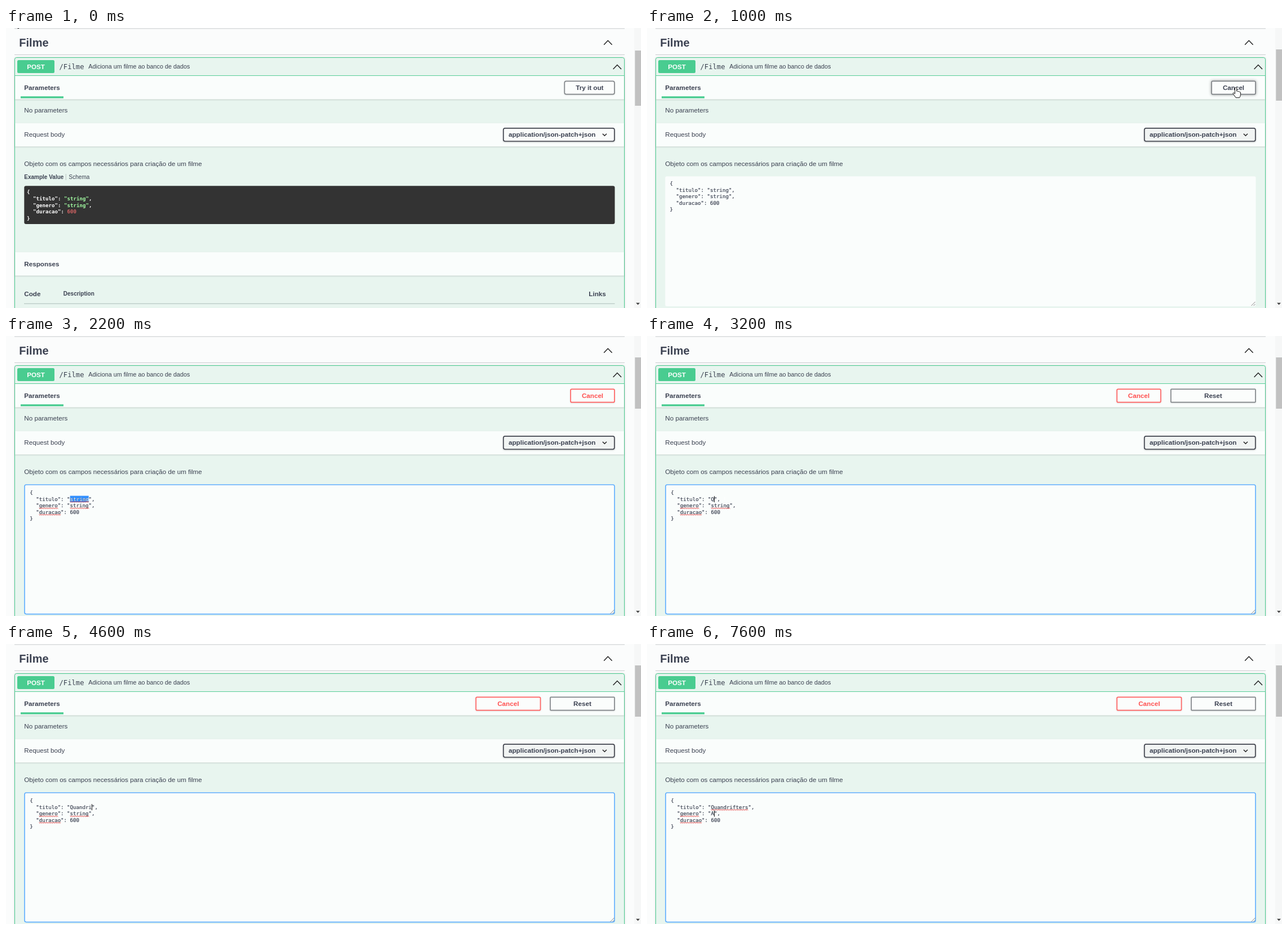
Animation of 1127 by 497 pixels, one loop 8 s. Source, as an HTML page:

```html
<!DOCTYPE html>
<html lang="pt">
<head>
<meta charset="utf-8">
<title>API form</title>
<style>
  html, body { margin: 0; width: 100%; height: 100%; overflow: hidden; background: #fbfcfc; }
  svg { display: block; width: 100vw; height: 100vh; }
  text { font: 11.67px "Liberation Sans", Arial, sans-serif; fill: #3b4151; white-space: pre; }
  .b { font-weight: bold; }
  .mid { text-anchor: middle; }
  .small { font-size: 10px; }
  .mono { font: 9.135px "DejaVu Sans Mono", monospace; }
  .code { font-weight: bold; fill: #fff; }
  .area { stroke: #3b4151; stroke-width: .2px; }
  .line { fill: none; stroke: #222; stroke-width: 1.5; }
  .bar { fill: #fafdfc; filter: drop-shadow(0 1px 1px rgba(0,0,0,.16)); }
  .btn { fill: #fbfdfc; stroke: #808488; stroke-width: 1.67; filter: drop-shadow(0 1px 1px rgba(0,0,0,.1)); }
  .hover { filter: drop-shadow(0 0 2.5px rgba(0,0,0,.4)); }
  .cursor { fill: #fff; stroke: #111; stroke-width: 1; stroke-linejoin: round; }
  .wave { fill: none; stroke: #e02020; stroke-width: .9; }
</style>
</head>
<body>
<svg id="stage" viewBox="0 0 1127 497" preserveAspectRatio="none">
  <rect width="1127" height="497" fill="#fbfcfc"/>
  <path d="M15 1H1098M15 47.4H1098" stroke="#c3c6c9" stroke-width=".9"/>
  <text class="b" x="23.3" y="33" style="font-size:20px">Filme</text>
  <path class="line" d="M1061.2 29.8L1068.3 22.3L1075.6 29.8"/>

  <rect x="15.5" y="52.5" width="1082" height="460" rx="3.3" fill="#e8f5ef" stroke="#49cc90"
    style="filter:drop-shadow(0 0 1.5px rgba(0,0,0,.19))"/>
  <path d="M16 84.5H1097" stroke="#49cc90" stroke-width=".9"/>
  <rect x="20" y="57" width="66" height="23" rx="2.5" fill="#49cc90"/>
  <text class="b mid" x="53" y="73" style="fill:#fff">POST</text>
  <text class="mono b" x="94.5" y="73" style="font-size:12.18px">/Filme</text>
  <text x="146.3" y="72.3" style="font-size:10.8px">Adiciona um filme ao banco de dados</text>
  <path class="line" d="M1077.6 73L1084.8 65.6L1092 73"/>

  <rect class="bar" x="16" y="85" width="1081" height="41.5"/>
  <rect x="26" y="121.3" width="76" height="3.4" fill="#49cc90"/>
  <text class="b" x="32.3" y="110">Parameters</text>
  <text x="32.3" y="149.8">No parameters</text>
  <rect class="bar" x="16" y="169" width="1081" height="41.3"/>
  <text x="32.3" y="193.3">Request body</text>
  <rect id="type" x="882.8" y="177.8" width="197" height="23.2" rx="3" stroke="#41444e" stroke-width="1.67"
    style="filter:drop-shadow(0 1px 1px rgba(0,0,0,.25))"/>
  <text class="b" x="892" y="193.3">application/json-patch+json</text>
  <path class="line" d="M1058.8 187.8L1062.4 191.3L1066 187.8"/>
  <text x="32.3" y="244.5">Objeto com os campos necessários para criação de um filme</text>

  <g id="idle">
    <rect class="btn" id="try" x="991.3" y="94.3" width="88.6" height="23.4" rx="3"/>
    <text class="b mid" x="1035.8" y="110">Try it out</text>
    <text class="b small" x="32.3" y="268">Example Value</text>
    <path d="M106.3 259V270" stroke="#b9c4c0"/>
    <text class="small" x="111.6" y="268">Schema</text>
    <rect x="32.3" y="280.3" width="1048.2" height="67.7" rx="3.3" fill="#333"/>
    <g id="sample"></g>
    <rect class="bar" x="16" y="398" width="1081" height="41.5"/>
    <text class="b" x="32.3" y="422.6">Responses</text>
    <text class="b" x="32.3" y="476">Code</text>
    <text class="b small" x="101.8" y="475.3">Description</text>
    <text class="b" x="1034.3" y="476">Links</text>
    <path d="M32 489.3H1080.5" stroke="#a9b8b5" stroke-width=".9"/>
  </g>

  <g id="edit">
    <rect class="btn" id="cancel" y="94.3" height="23.4" rx="2"/>
    <text class="b mid" id="cancelText" y="110">Cancel</text>
    <g id="reset">
      <rect class="btn" id="resetBox" y="94.3" height="23.4" rx="1"/>
      <text class="b mid" id="resetText" y="110">Reset</text>
    </g>
    <rect id="box" rx="3" fill="#fafdfc" stroke-width="1.67"/>
    <path d="M1072.5 493L1079.5 486M1076.5 493L1079.5 490" stroke="#777" stroke-width=".9"/>
    <rect id="mark" height="11.4" fill="#3390ff"/>
    <g id="rows"></g>
    <text class="mono" id="marked" style="fill:#fff"></text>
    <path class="wave" id="wave"/>
    <path id="caret" stroke="#111" stroke-width="1"/>
    <path id="beam" d="M138 286V291" stroke="#fff" stroke-width="1" opacity=".7"/>
  </g>

  <rect x="1115" width="12" height="497" fill="#f6f7f7"/>
  <rect id="thumb" x="1116.3" width="10.7" fill="#c1c1c1"/>
  <path d="M1118 487.8H1125L1121.5 491.6Z" fill="#444"/>
  <path class="cursor" id="arrow" d="M0 0V14L3.2 11L5.3 16L7.3 15L5.3 10.3H10Z"/>
  <path class="cursor" id="hand" d="M-1.6 1Q0 -1.2 1.6 1V6.6Q3.4 5.8 4 7.3Q5.8 6.5 6.4 8Q8.2 7.4 8.5 9.4V13Q8 16 6.6 18.2H0Q-2.6 14 -5 11Q-5.2 8.8 -3.2 9.8L-1.6 11.3Z"/>
</svg>
<script>
const LOOP = 8000, PITCH = 5.5, QUOTE = 13, TITLE = 'Quandrifters';
const keyTimes = [3200, 3500, 3800, 4000, 4000, 4600, 4600, 5000, 5100, 5300, 5600, 5800];
const dragSteps = [0, 2, 4, 5, 6];
const $ = id => document.getElementById(id);
const clamp = v => Math.max(0, Math.min(1, v));
const lerp = (a, b, p) => a + (b - a) * p;
const mix = (a, b, p) => `rgb(${a.map((v, i) => Math.round(lerp(v, b[i], p)))})`;
const show = (id, on) => $(id).setAttribute('display', on ? 'inline' : 'none');

function set(el, attrs) {
  for (const k in attrs) el.setAttribute(k, attrs[k]);
}

function addText(parent, cls) {
  const el = document.createElementNS('http://www.w3.org/2000/svg', 'text');
  el.setAttribute('class', cls);
  $(parent).appendChild(el);
  return el;
}

// Read-only sample: key, value, value colour, trailing mark
const fields = [['titulo', '"string"', '#a2fca2', ','], ['genero', '"string"', '#a2fca2', ','], ['duracao', '600', '#d36363', '']];
const sampleY = i => 294.4 + i * 11.67;
['{', '}'].forEach((c, i) => {
  const el = addText('sample', 'mono code');
  el.textContent = c;
  set(el, { x: 37, y: sampleY(i * 4) });
});
fields.forEach(([key, value, color, end], i) => {
  const el = addText('sample', 'mono code');
  el.innerHTML = `"${key}": <tspan fill="${color}">${value}</tspan>${end}`;
  set(el, { x: 48, y: sampleY(i + 1) });
});

const rows = Array.from({ length: 5 }, () => addText('rows', 'mono area'));

function wave(x, y, count) {
  let d = `M${x} ${y}`;
  const n = Math.round(count * PITCH / 1.6);
  for (let i = 1; i <= n; i++) d += `L${x + i * 1.6} ${y + (i % 2 ? 1.5 : 0)}`;
  return d;
}

function pointer(s) {
  if (s < 1000) {
    const p = clamp((s - 100) / 800), e = p * p * (3 - 2 * p);
    return [lerp(16, 1045, e), lerp(-15, 105.5, e)];
  }
  if (s < 1100) return [1045, 105.5];
  if (s < 1200) return [800, 165];
  if (s < 1400) return [525, 219];
  return s < 1500 ? [320, 255] : null;
}

function drawPointer(s) {
  const at = pointer(s), over = !!at && at[0] > 991 && at[1] > 93;
  show('arrow', at && !over);
  show('hand', over);
  if (at) set($(over ? 'hand' : 'arrow'), { transform: `translate(${at})` });
  $('try').classList.toggle('hover', over);
  $('cancel').classList.toggle('hover', over);
}

function drawButtons(s) {
  const changed = s >= 3200, red = clamp((s - 1000) / 200);
  const p = 1 - (1 - clamp((s - 3200) / 300)) ** 2;
  const left = changed ? 834.1 : 1002.1;
  const right = changed ? lerp(911.8, 948.5, p) : 1079.9;
  const resetLeft = lerp(929.8, 966, p);
  set($('cancel'), { x: left, width: right - left });
  $('cancel').style.stroke = mix([128, 132, 136], [255, 96, 96], red);
  set($('cancelText'), { x: (left + right) / 2 });
  $('cancelText').style.fill = mix([59, 65, 81], [255, 80, 80], red);
  show('reset', changed);
  set($('resetBox'), { x: resetLeft, width: 1079.9 - resetLeft });
  set($('resetText'), { x: (resetLeft + 1079.9) / 2 });
}

function drawEditor(s) {
  const focus = s >= 2100;
  const x0 = focus ? 42.2 : 40.5, y0 = focus ? 281.2 : 279.4;
  const colX = c => x0 + c * PITCH, rowY = r => y0 + r * 11.45;
  const typed = keyTimes.filter(k => k <= s).length;
  const title = typed ? TITLE.slice(0, typed) : 'string';
  const genre = s < 7600 ? 'string' : 'A';

  set($('box'), focus
    ? { x: 33, y: 264, width: 1047, height: 229.6, stroke: '#61affe' }
    : { x: 32.3, y: 263.3, width: 1048.2, height: 230.7, stroke: 'none' });
  ['{', `  "titulo": "${title}",`, `  "genero": "${genre}",`, '  "duracao": 600', '}'].forEach((line, i) => {
    rows[i].textContent = line;
    set(rows[i], { x: x0, y: rowY(i) });
  });

  let row = 1, from = typed || 4, to = from;
  if (s >= 2200 && s < 3200) { from = 0; to = 6; }
  if (s >= 6600) {
    row = 2;
    to = s < 7600 ? 6 : 1;
    from = s < 7600 ? 6 - dragSteps[Math.min(4, (s - 6600) / 100)] : 1;
  }
  const x = colX(QUOTE + from), selected = to > from;
  show('mark', selected);
  set($('mark'), { x, y: rowY(row) - 9, width: (to - from) * PITCH });
  $('marked').textContent = selected ? 'string'.slice(from, to) : '';
  set($('marked'), { x, y: rowY(row) });
  show('caret', focus && !selected);
  set($('caret'), { d: `M${x + .3} ${rowY(row) - 8.5}V${rowY(row) + 2.5}` });

  let d = wave(colX(3), rowY(2) + 1, 6) + wave(colX(3), rowY(3) + 1, 7);
  if (s < 7600) d += wave(colX(QUOTE), rowY(2) + 1, 6);
  if (!typed || s >= 6600) d += wave(colX(QUOTE), rowY(1) + 1, title.length);
  set($('wave'), { d });
  show('wave', focus);
  show('beam', s >= 1900 && s < 6200 && !selected);
}

function render(t) {
  const s = Math.floor(t / 100) * 100, editing = s >= 1000;
  show('idle', !editing);
  show('edit', editing);
  set($('type'), { fill: editing ? '#f1f4f3' : '#fafcfb' });
  set($('thumb'), editing ? { y: 38, height: 91 } : { y: 40, height: 98 });
  drawPointer(s);
  if (editing) {
    drawButtons(s);
    drawEditor(s);
  }
}

const start = performance.now();
function tick() {
  render((performance.now() - start) % LOOP);
  requestAnimationFrame(tick);
}
tick();
</script>
</body>
</html>
```
